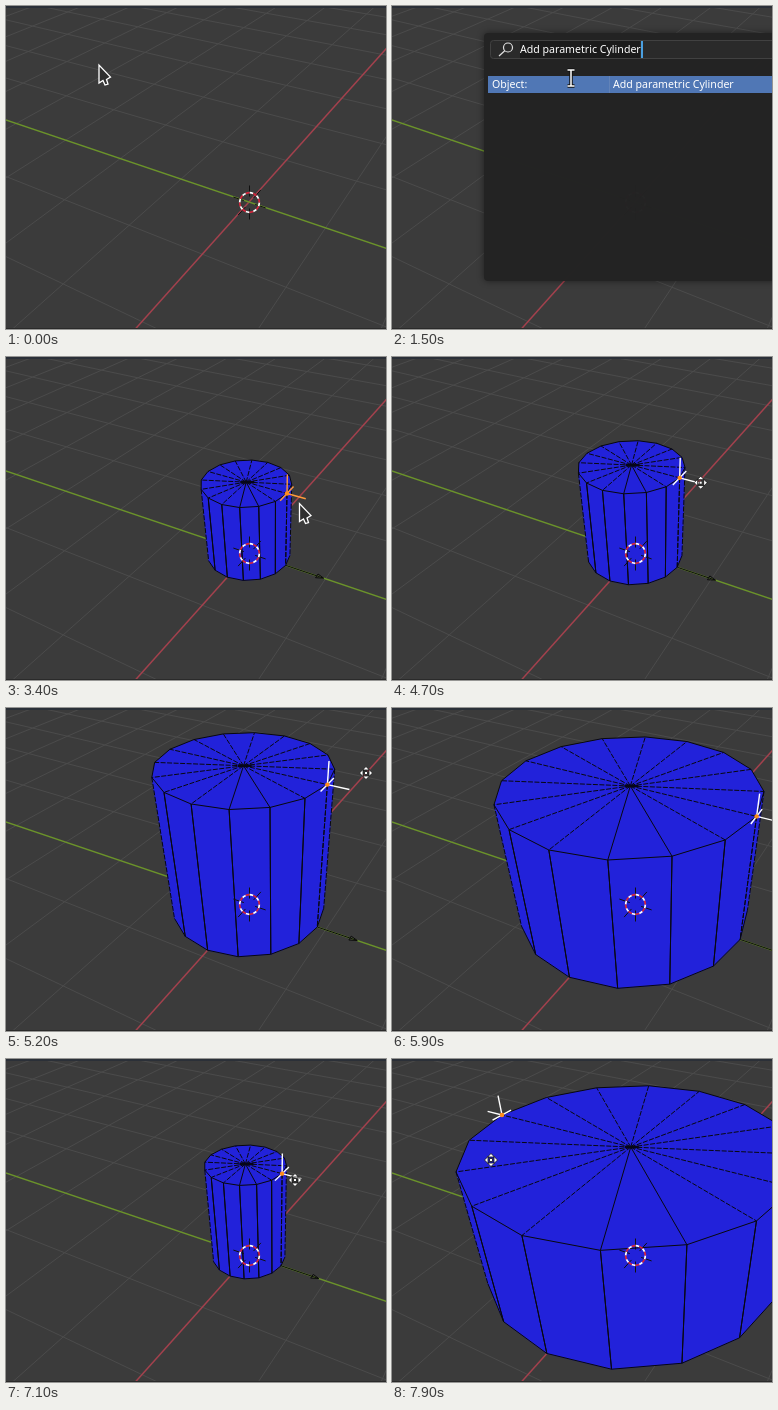
These frames come from a looping animation (380x323 px, 8000 ms). An HTML page with a canvas:

```html
<!DOCTYPE html>
<html lang="en">
<head>
<meta charset="utf-8">
<title>Parametric cylinder</title>
<style>
html, body { margin: 0; width: 100%; height: 100%; overflow: hidden; background: #3b3b3b; }
canvas { display: block; }
</style>
</head>
<body>
<canvas id="view" width="380" height="323"></canvas>
<script>
const ctx = document.getElementById('view').getContext('2d');
const LOOP = 8000, FOCAL = 508, SIDES = 16, GRID = 83;
const LABEL = 'Add parametric Cylinder';

// World axes in camera space: right, up, depth
const ORIGIN = [-25, -4, 508];
const AX = [.4648, .552, .6924], AY = [-.8855, .2897, .3634], AZ = [0, .782, -.6235];

function project(x, y, z = 0) {
  const [r, u, d] = ORIGIN.map((o, i) => o + x * AX[i] + y * AY[i] + z * AZ[i]);
  return [268 + FOCAL * r / d, 192 - FOCAL * u / d];
}

// time, signed radius, height, pointer x, pointer y
const DRAG = [
  [4500, 41, 82, 294, 147],
  [4800, 50, 108, 316, 115],
  [5200, 74.5, 146, 360, 65],
  [5400, 85, 157, 380, 48],
  [5500, 89, 157, 392, 50],
  [5900, 111.5, 128, 430, 100],
  [6300, 147, 104, 500, 130],
  [6400, 147, 104, 500, 130],
  [6600, 163, 100, 520, 135],
  [7100, 36, 102.4, 289, 121],
  [7300, 10, 106, 257, 116],
  [7900, -142.4, 118.7, 99, 101]
];

// time, pointer x, pointer y
const MOVES = [
  [400, 93, 59], [800, 179, 72], [1800, 179, 72], [2200, 254, 149],
  [2500, 254, 149], [2700, 198, 140], [2800, 215, 124], [3000, 293.5, 146.5]
];

function sample(keys, t) {
  if (t <= keys[0][0]) return keys[0].slice(1);
  const i = keys.findIndex(k => k[0] >= t);
  if (i < 0) return keys[keys.length - 1].slice(1);
  const a = keys[i - 1], b = keys[i], f = (t - a[0]) / (b[0] - a[0]);
  return a.slice(1).map((v, j) => v + (b[j + 1] - v) * f);
}

function trace(points, close) {
  ctx.beginPath();
  points.forEach(p => ctx.lineTo(...p));
  if (close) ctx.closePath();
}

function line(points, color, width = 1, dash = []) {
  trace(points);
  ctx.setLineDash(dash);
  ctx.strokeStyle = color;
  ctx.lineWidth = width;
  ctx.stroke();
  ctx.setLineDash([]);
}

function shape(points, fill, stroke, width = 1) {
  trace(points, true);
  ctx.fillStyle = fill;
  ctx.fill();
  ctx.strokeStyle = stroke;
  ctx.lineWidth = width;
  ctx.stroke();
}

function drawFloor() {
  ctx.fillStyle = '#3b3b3b';
  ctx.fillRect(0, 0, 380, 323);
  const alongX = k => [project(-400, k), project(3000, k)];
  const alongY = k => [project(k, -400), project(k, 3000)];
  for (let k = -4; k <= 24; k++) {
    if (!k) continue;
    line(alongX(k * GRID), '#4b4b4b');
    line(alongY(k * GRID), '#4b4b4b');
  }
  line(alongX(0), '#a3414d', 1.5);
  line(alongY(0), '#6b932a', 1.5);
}

function drawArrow(r) {
  const s = r < 0 ? 1 : -1, out = Math.abs(r);
  const at = (d, side = 0) => project(side, s * (out + d));
  line([at(0), at(40)], '#0b0b0b');
  line([at(33, -3), at(40), at(33, 3), at(33, -3)], '#0b0b0b');
}

function drawCylinder(radius, h, wire) {
  const r = Math.abs(radius), blue = '#2222da';
  const angle = i => i * 2 * Math.PI / SIDES;
  const ring = z => Array.from({ length: SIDES }, (_, i) =>
    project(r * Math.cos(angle(i)), r * Math.sin(angle(i)), z));
  const top = ring(h), base = ring(0), mid = project(0, 0, h);
  const facing = i => Math.cos(angle(i) - 3.625);
  const dash = [5, 1.5];
  const front = [];
  for (let i = 0; i < SIDES; i++) {
    const j = (i + 1) % SIDES, [a, b, c] = [top[i], top[j], base[i]];
    if ((b[0] - a[0]) * (c[1] - a[1]) > (b[1] - a[1]) * (c[0] - a[0])) front.push([i, j]);
  }
  for (const [i, j] of front) shape([top[i], top[j], base[j], base[i]], blue, blue, .6);
  shape(top, blue, wire);
  for (const [i, j] of front) {
    line([base[i], base[j]], wire);
    for (const k of [i, j]) line([top[k], base[k]], wire, 1, facing(k) > .6 ? [] : dash);
  }
  top.forEach((p, i) => line([mid, p], wire, 1, facing(i) > .9 ? [] : dash));
  line([[mid[0] - 6, mid[1]], [mid[0] + 8, mid[1]]], '#060618', 2.5);
}

function drawHandle(r, h, color) {
  const s = r < 0 ? 1 : -1;
  const p = project(0, -r, h);
  line([p, project(0, -r, h + 19)], color, 1.4);
  line([p, project(0, -r + s * 18, h)], color, 1.4);
  line([project(-13, -r, h), project(13, -r, h)], color, 1.4);
  ctx.fillStyle = '#ff8c1a';
  ctx.beginPath();
  ctx.arc(...p, 2.2, 0, 7);
  ctx.fill();
}

function drawOriginMark() {
  const x = 243.5, y = 196.5;
  for (const [dx, dy] of [[0, 1], [.95, .32], [.67, -.74]]) {
    for (const s of [-1, 1]) {
      line([[x + s * dx * 6, y + s * dy * 6], [x + s * dx * 17, y + s * dy * 17]], '#101010');
    }
  }
  ctx.lineWidth = 1.7;
  for (const [color, offset] of [['#fff', 0], ['#d9253c', Math.PI / 8]]) {
    ctx.strokeStyle = color;
    for (let i = 0; i < 8; i++) {
      const a = i * Math.PI / 4 + offset;
      ctx.beginPath();
      ctx.arc(x, y, 9.8, a, a + Math.PI / 8);
      ctx.stroke();
    }
  }
}

function drawText(str, x, y) {
  ctx.font = '10.6px "Noto Sans", "Open Sans", sans-serif';
  ctx.fillStyle = '#fff';
  ctx.fillText(str, x, y);
}

function drawMenu(t) {
  ctx.save();
  ctx.shadowColor = 'rgba(0,0,0,.5)';
  ctx.shadowBlur = 7;
  ctx.fillStyle = 'rgba(35,35,35,.975)';
  ctx.beginPath();
  ctx.roundRect(92, 27, 310, 248, 4);
  ctx.fill();
  ctx.restore();

  ctx.fillStyle = '#2a2a2a';
  ctx.strokeStyle = '#414141';
  ctx.lineWidth = 1;
  ctx.beginPath();
  ctx.roundRect(98.5, 34.5, 300, 18, 3);
  ctx.fill();
  ctx.stroke();
  ctx.strokeStyle = '#e0e0e0';
  ctx.lineWidth = 1.2;
  ctx.beginPath();
  ctx.arc(116, 41.5, 4.5, 0, 7);
  ctx.moveTo(112.5, 45);
  ctx.lineTo(107, 50);
  ctx.stroke();

  const typed = LABEL.slice(0, Math.max(0, (t - 900) / 100 * 4));
  ctx.fillStyle = '#1b1b1b';
  ctx.fillRect(128, 35, 120, 17);
  drawText(typed, 128, 47);
  ctx.fillStyle = '#4a9fe0';
  ctx.fillRect(128 + Math.round(ctx.measureText(typed).width), 35, 2, 17);

  ctx.fillStyle = '#5077b5';
  ctx.fillRect(96, 70, 284, 17);
  ctx.fillStyle = '#6283b8';
  ctx.fillRect(217, 70, 1, 17);
  drawText('Object:', 100, 82);
  drawText(LABEL, 221, 82);
}

function drawPointer(x, y) {
  const pts = [[0, 0], [0, 18], [4, 15.5], [6, 20], [9, 19], [7.5, 14.5], [11.5, 12]];
  shape(pts.map(p => [x + p[0], y + p[1]]), '#303030', '#fff', 1.3);
}

function drawBeam(x, y) {
  for (const [color, width] of [['#111', 3.5], ['#fff', 1.5]]) {
    line([[x, y - 8], [x, y + 8]], color, width);
    for (const e of [-8, 8]) line([[x - 3.5, y + e], [x + 3.5, y + e]], color, width);
  }
}

function drawMover(x, y) {
  ctx.save();
  ctx.translate(x, y);
  for (let i = 0; i < 4; i++) {
    shape([[0, -6.5], [3.5, -3], [-3.5, -3]], '#fff', '#111', .8);
    ctx.rotate(Math.PI / 2);
  }
  shape([[-1.5, -1.5], [1.5, -1.5], [1.5, 1.5], [-1.5, 1.5]], '#fff', '#111', .8);
  ctx.restore();
}

function draw(t) {
  const menu = t >= 500 && t < 1600;
  const [r, h, mx, my] = sample(DRAG, t);
  drawFloor();
  if (t >= 2400) {
    const picked = t >= 3300;
    drawArrow(r);
    drawCylinder(r, h, picked ? '#08080f' : '#f5a02c');
    drawHandle(r, h, t >= 4600 ? '#fff' : picked ? '#ff9a3c' : '#101010');
  }
  drawOriginMark();
  if (menu) drawMenu(t);
  ctx.fillStyle = '#2b3038';
  ctx.fillRect(0, 0, 380, 2);
  ctx.fillStyle = '#2a2a2a';
  ctx.fillRect(0, 322, 380, 1);

  const [px, py] = sample(MOVES, t);
  if (t >= 4400) drawMover(mx, my);
  else if (menu && t >= 700) drawBeam(px, py);
  else drawPointer(px, py);
}

const start = performance.now();
function tick() {
  const t = (performance.now() - start) % LOOP;
  draw(Math.floor(t / 100) * 100);
  requestAnimationFrame(tick);
}
tick();
</script>
</body>
</html>
```
